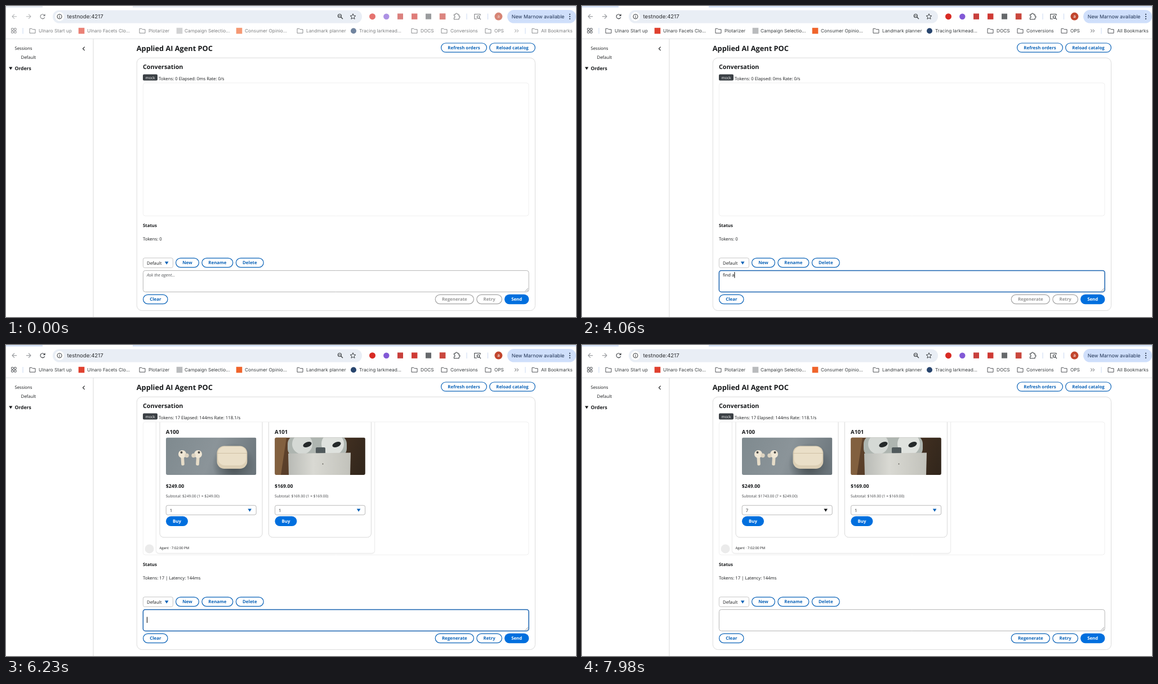
An HTML page with a canvas that plays this animation: 1012 by 553 pixels, repeating every 8 s.

```html
<!DOCTYPE html>
<html lang="en">
<head>
<meta charset="utf-8">
<title>Agent console</title>
<style>
html, body { margin: 0; width: 100%; height: 100%; overflow: hidden; background: #fff; }
canvas { display: block; width: 1012px; height: 553px; }
</style>
</head>
<body>
<canvas id="stage"></canvas>
<script>
const W = 1012, H = 553, LOOP = 8000;
const PAGE = "'Open Sans', 'Noto Sans', sans-serif";
const UI = "Inter, Roboto, sans-serif";
const BLUE = '#0b63b8', FILL = '#006fde', INK = '#17191b';
const QUERY = 'find avodels';

const canvas = document.getElementById('stage');
const g = canvas.getContext('2d');
const dpr = window.devicePixelRatio || 1;
canvas.width = W * dpr;
canvas.height = H * dpr;

// y is the middle of the capitals
function text(s, x, y, size, o = {}) {
  g.font = `${o.italic ? 'italic ' : ''}${o.weight || 400} ${size}px ${o.font || PAGE}`;
  g.textAlign = o.align || 'left';
  g.textBaseline = 'alphabetic';
  g.fillStyle = o.color || INK;
  g.fillText(s, x, y + size * 0.357);
}
const bold = (s, x, y, size, color) => text(s, x, y, size, { weight: 700, color });

function box(x, y, x2, y2, r, fill, stroke, lw = 1) {
  g.beginPath();
  g.roundRect(x, y, x2 - x, y2 - y, r);
  if (fill) { g.fillStyle = fill; g.fill(); }
  if (stroke) { g.strokeStyle = stroke; g.lineWidth = lw; g.stroke(); }
}
function disc(x, y, r, fill) {
  g.beginPath();
  g.arc(x, y, r, 0, 7);
  g.fillStyle = fill;
  g.fill();
}
function ring(x, y, r, color, lw = 1, from = 0, to = Math.PI * 2) {
  g.beginPath();
  g.arc(x, y, r, from, to);
  g.strokeStyle = color;
  g.lineWidth = lw;
  g.stroke();
}
function line(color, lw, ...p) {
  g.beginPath();
  for (let i = 0; i < p.length; i += 2) g.lineTo(p[i], p[i + 1]);
  g.strokeStyle = color;
  g.lineWidth = lw;
  g.stroke();
}
function poly(fill, ...p) {
  g.beginPath();
  for (let i = 0; i < p.length; i += 2) g.lineTo(p[i], p[i + 1]);
  g.closePath();
  g.fillStyle = fill;
  g.fill();
}
const down = (x, y, color) => poly(color, x - 3.3, y - 2.6, x + 3.3, y - 2.6, x, y + 2.8);

function pill(label, x, x2, y, kind = 'outline') {
  const mid = (x + x2) / 2;
  const look = {
    outline: [null, BLUE, BLUE],
    off: [null, '#a5a5a5', '#979797'],
    fill: [FILL, null, '#fff'],
    hover: ['#005fc0', null, '#fff'],
    dim: ['#e9e9e9', null, '#8f8f8f']
  }[kind];
  const d = look[1] ? 0.6 : 0;
  box(x + d, y + d, x2 - d, y + 17.4 - d, 8.7, look[0], look[1], 1.2);
  text(label, mid, y + 8.7, 7.85, { weight: 700, color: look[2], align: 'center' });
}

// last entry whose time has been reached
function step(t, list, start) {
  let v = start;
  for (const [at, value] of list) if (t >= at) v = value;
  return v;
}
const within = (t, spans) => spans.some(([a, b]) => t >= a && t < b);

function folder(x, y) {
  g.beginPath();
  g.moveTo(x - 5, y + 4);
  g.lineTo(x - 5, y - 4);
  g.lineTo(x - 1.2, y - 4);
  g.lineTo(x + 0.2, y - 2.5);
  g.lineTo(x + 5, y - 2.5);
  g.lineTo(x + 5, y + 4);
  g.closePath();
  g.lineJoin = 'round';
  g.strokeStyle = '#505357';
  g.lineWidth = 1;
  g.stroke();
}

function star(x, y, r) {
  g.beginPath();
  for (let i = 0; i < 10; i++) {
    const a = -Math.PI / 2 + i * Math.PI / 5, q = i % 2 ? r * 0.45 : r;
    g.lineTo(x + q * Math.cos(a), y + q * Math.sin(a));
  }
  g.closePath();
  g.strokeStyle = '#3c4043';
  g.lineWidth = 1;
  g.stroke();
}

function arrow(x, y, dir, color) {
  line(color, 1.1, x - 4.2 * dir, y, x + 4 * dir, y);
  line(color, 1.1, x, y - 4, x + 4 * dir, y, x, y + 4);
}

const marks = [
  [47, 'Ulnaro Start up', 58],
  [134, 'Ulnaro Facets Clo...', 144, '#e0402f'],
  [242, 'Plotarizer', 253],
  [308, 'Campaign Selectio...', 317, '#b9bbbd'],
  [414, 'Consumer Opinio...', 424, '#f0642c'],
  [522, 'Landmark planner', 533],
  [617, 'Tracing larkmead...', 627, '#28456e', true],
  [725, 'DOCS', 736],
  [778, 'Conversions', 789],
  [856, 'OPS', 867],
  [939, 'All Bookmarks', 950]
];

function browser(t) {
  const live = step(t, [[770, 0.5], [840, 1]], 0);
  const fade = 0.66 + 0.34 * live;
  g.fillStyle = live > 0.5 ? '#d5e2f7' : '#e3e8f0';
  g.fillRect(0, 0, W, 2.6);
  g.fillStyle = '#fff';
  g.fillRect(65, 0, 160, 3);

  box(83, 7.5, 632, 30.5, 11.5, '#e9eef5');
  disc(95, 18.8, 8, '#fff');
  ring(95, 18.8, 4, '#3c4043', 1.1);
  line('#3c4043', 1.1, 95, 18.3, 95, 21);
  line('#3c4043', 1.1, 95, 16.3, 95, 17.3);
  text('testnode:4217', 108.5, 18.8, 9.65, { font: UI, color: '#2b2d30' });
  ring(592.4, 17.5, 3, '#3c4043', 1.2);
  line('#3c4043', 1.3, 594.6, 19.7, 598, 23);
  line('#3c4043', 0.9, 590.8, 17.5, 594, 17.5);
  star(616, 19, 5.2);

  g.globalAlpha = fade;
  arrow(15, 18.7, -1, '#909397');
  arrow(40, 18.7, 1, '#909397');
  ring(65, 18.7, 3.9, '#45484c', 1.2, 0.3, 5.5);
  poly('#45484c', 69.6, 14, 69.6, 18, 65.6, 18);

  disc(650.5, 18.7, 5.5, '#d82b24');
  disc(675.3, 18.7, 5.2, '#8259d6');
  box(695, 13.4, 705, 23.8, 0, '#c8403c');
  box(720, 13.4, 730.4, 23.8, 0, '#cf3a34');
  box(745, 13.6, 755, 23.6, 0, '#66696c');
  box(769.8, 13.2, 780.4, 24, 0, '#c9473d');
  g.beginPath();
  g.moveTo(795.5, 15);
  g.lineTo(798, 15);
  g.arc(799.8, 14.6, 1.6, Math.PI, 0);
  g.lineTo(804, 15);
  g.lineTo(804, 18);
  g.arc(804.4, 19.5, 1.6, -Math.PI / 2, Math.PI / 2);
  g.lineTo(804, 23.8);
  g.lineTo(795.5, 23.8);
  g.lineTo(795.5, 21);
  g.arc(795.7, 19.3, 1.5, Math.PI / 2, -Math.PI / 2, true);
  g.closePath();
  g.strokeStyle = '#3c4043';
  g.lineWidth = 1.1;
  g.stroke();
  line('#3c4043', 1.1, 836, 23, 831.8, 23, 831.8, 14.5, 842, 14.5, 842, 17);
  ring(838.6, 19.6, 2.3, '#3c4043', 1.1);
  line('#3c4043', 1.1, 840.3, 21.3, 843, 24);
  disc(874.4, 18.6, 7, '#c2462e');
  text('a', 874.4, 17.7, 8, { font: UI, color: '#fff', align: 'center' });
  g.globalAlpha = 1;
  for (const x of [818, 855.5]) line('#cbd9f1', 1, x, 13.5, x, 24);

  box(890, 7, 1012, 30.6, 11.8, '#cfdffb');
  text('New Marnow available', 897.8, 18.8, 8.75, { font: UI, color: '#1e3152' });
  for (const y of [14.7, 18.7, 22.7]) disc(1001, y, 1.05, '#1e2c44');

  g.globalAlpha = fade;
  for (const x of [11.5, 16.5]) for (const y of [41.5, 46.5]) {
    box(x - 1.9, y - 1.9, x + 1.6, y + 1.6, 0.4, null, '#505357', 1);
  }
  for (const [x, label, tx, color, round] of marks) {
    if (!color) folder(x, 44.2);
    else if (round) disc(x, 44.2, 5, color);
    else box(x - 5.3, 38.8, x + 5.3, 49.4, 0, color);
    text(label, tx, 44.2, 8.25, { font: UI, color: '#3c4043' });
  }
  for (const x of [903.3, 907]) line('#505357', 1, x, 41.6, x + 2.6, 44.2, x, 46.8);
  g.globalAlpha = 1;
  for (const x of [30, 922]) line('#cbd9f1', 1, x, 39, x, 49.5);
  line('#dfe1e4', 1, 0, 58.3, W, 58.3);
}

function shell() {
  line('#d9d9d9', 1, 155, 58.5, 155, H);
  text('Sessions', 15.4, 75.5, 7.75);
  line(INK, 1.1, 139.6, 72.6, 136.4, 75.9, 139.6, 79.2);
  text('Default', 26.5, 91, 7.75);
  poly(INK, 5.2, 108.4, 11.4, 108.4, 8.3, 113.4);
  bold('Orders', 15.4, 110.8, 8.6);
  bold('Applied AI Agent POC', 231.8, 75, 12.75);
  pill('Refresh orders', 772, 854, 65.4);
  pill('Reload catalog', 858, 940, 65.4);
  box(232.3, 92.3, 939.5, 541.6, 9, '#fff', '#dcdcdc', 1);
  bold('Conversation', 243, 108.2, 10.75);
  box(243, 121.4, 269, 132.6, 2, '#3b4045');
  text('mock', 256, 127.2, 6.7, { color: '#fff', align: 'center' });
  bold('Status', 243, 389.8, 7.85);
}

function meta(who, x, y, color) {
  text(`${who} · 7:02:00 PM`, x, y, 6.1, { color });
}

function budPhoto() {
  const bg = g.createLinearGradient(284, 165, 444, 231);
  bg.addColorStop(0, '#7f8a8f');
  bg.addColorStop(0.5, '#8b9499');
  bg.addColorStop(1, '#697379');
  g.fillStyle = bg;
  g.fillRect(284, 164.5, 160.4, 66.5);
  const shade = g.createRadialGradient(404, 212, 10, 404, 212, 38);
  shade.addColorStop(0, '#4f585c');
  shade.addColorStop(1, 'rgba(79,88,92,0)');
  g.fillStyle = shade;
  g.fillRect(364, 172, 80, 59);
  box(374.5, 179.5, 428.3, 220, 13, '#dccfb5');
  box(376.5, 180.5, 426.5, 214, 12, '#eadfc8');
  line('#c9bc9f', 0.8, 375, 192.5, 428, 192.5);
  for (const s of [-1, 1]) {
    const x = 327 + s * 14;
    g.lineCap = 'round';
    line('#e6dcc8', 5.6, x, 196, x - s * 2 + s * 1, 211.5);
    g.lineCap = 'butt';
    disc(x, 194, 7, '#efe6d4');
    disc(x - s * 8, 196.5, 3.7, '#ddd3c0');
    disc(x + s * 1.5, 191, 2, '#4b4a46');
  }
}

function casePhoto() {
  const bg = g.createLinearGradient(477, 165, 638, 231);
  bg.addColorStop(0, '#65462e');
  bg.addColorStop(0.5, '#4a3524');
  bg.addColorStop(1, '#30251b');
  g.fillStyle = bg;
  g.fillRect(477, 164.5, 161, 66.5);
  poly('#82603f', 477, 164.5, 498, 164.5, 488, 231, 477, 231);
  box(500, 160, 605, 200, 16, '#aeb5b0');
  disc(526, 176, 18, '#d5d9d5');
  disc(580, 176, 20, '#dfe2de');
  for (const x of [535, 587]) {
    g.beginPath();
    g.ellipse(x, 177, 8, 4.4, -0.4, 0, 7);
    g.fillStyle = '#25292a';
    g.fill();
  }
  box(550, 182, 567, 193, 2, '#515a5c');
  const front = g.createLinearGradient(501, 0, 612, 0);
  front.addColorStop(0, '#b8bab5');
  front.addColorStop(0.4, '#d9d9d3');
  front.addColorStop(1, '#c2c2bb');
  poly(front, 501, 193, 612, 191.5, 611, 231, 502, 231);
  disc(562.5, 211.5, 0.9, '#55524c');
}

function card(x, name, price, qty, photo, caret, buy) {
  const total = (qty * price).toFixed(2);
  box(x - 11, 70, x + 171, 342, 7, '#fff', '#d8d8d8', 1);
  bold(name, x - 0.3, 154.8, 9.7);
  g.save();
  g.beginPath();
  g.roundRect(x, 164.5, 160.4, 66.5, 3);
  g.clip();
  photo();
  g.restore();
  bold('$' + price.toFixed(2), x - 0.3, 250.4, 8.75);
  text(`Subtotal: $${total} (${qty} × $${price.toFixed(2)})`, x - 0.3, 268.4, 6.65, { color: '#3b3d40' });
  box(x + 0.2, 285.2, x + 160.2, 302, 3, '#fff', '#b9b9b9', 1);
  text(qty, x + 6.7, 294, 7.75);
  down(x + 148.7, 293.8, caret);
  pill('Buy', x, x + 39, 304.6, buy);
}

function results(t) {
  g.shadowColor = 'rgba(0,0,0,.1)';
  g.shadowBlur = 2 * dpr;
  g.shadowOffsetY = dpr;
  box(266.5, 60, 654.5, 370.3, 5, '#fff');
  g.shadowColor = 'transparent';
  box(266.5, 60, 654.5, 370.3, 5, null, '#ececec', 1);
  const dark = within(t, [[6650, 7210], [7980, LOOP]]);
  const hover = within(t, [[6440, 6650]]);
  card(284, 'A100', 249, t >= 7700 ? 7 : 1, budPhoto, dark ? INK : BLUE, hover ? 'hover' : 'fill');
  card(477.4, 'A101', 169, 1, casePhoto, BLUE, 'fill');
  disc(254.6, 362.4, 8, '#ebebeb');
  meta('Agent', 272.5, 360.4);
  g.globalAlpha = step(t, [[6020, 0.75], [6090, 0.5], [6160, 0.25], [6230, 0]], 1);
  box(921.5, 221.5, 926.3, 371.5, 2.4, '#c3c3c3');
  g.globalAlpha = 1;
}

function chat(t) {
  g.save();
  g.beginPath();
  g.rect(243, 137, 685, 236);
  g.clip();
  if (t >= 5390) results(t);
  else if (t >= 5180) {
    box(866.4, 142.3, 924.6, 174.6, [6, 6, 1, 6], '#0572bb');
    text(QUERY, 872, 153, 7.75, { color: '#fff' });
    meta('You', 872, 165, '#fff');
    if (t >= 5250) {
      const words = t >= 5320 ? 'Searching catalog for' : 'Searching';
      box(266.5, 179.8, t >= 5320 ? 354.3 : 331, 211.8, 5, '#fff', '#ebebeb', 1);
      text(words, 272.5, 189.6, 7.75);
      meta('Agent', 272.5, 201.8);
      disc(254.6, 204, 8, '#ebebeb');
    }
  }
  g.restore();
  box(243.4, 136.8, 928, 373.2, 4, null, '#f0f0f0', 1);
}

function counters(t) {
  const [n, ms, rate] = step(t, [[5250, [1, 20, 50]], [5320, [3, 61, 49.2]], [5390, [17, 144, 118.1]]], [0, 0, 0]);
  text(`Tokens: ${n} Elapsed: ${ms}ms Rate: ${rate}/s`, 271, 129, 7.75);
  text(`Tokens: ${n}${n > 3 ? ' | Latency: 144ms' : ''}`, 243, 413.8, 7.75);
}

function composer(t) {
  const focus = within(t, [[770, 6790]]);
  const busy = within(t, [[5180, 5460]]);
  const sent = t >= 5180;
  const typed = sent ? 0 : step(t, [[1540, 1], [1610, 2], [1750, 3], [1820, 4], [1960, 5], [4060, 6],
    [4340, 7], [4410, 8], [4620, 9], [4830, 11], [4970, 12]], 0);

  box(243.4, 448, 296.4, 465.4, 3, '#fff', '#c6c6c6', 1);
  text('Default', 250, 457, 7.75);
  down(285.2, 457, BLUE);
  pill('New', 301, 343, 447.8);
  pill('Rename', 347.3, 403.4, 447.8);
  pill('Delete', 407.8, 457.8, 447.8);

  box(243.4, 470.4, 928.2, 508.4, 4, '#fff', focus ? '#1a63b0' : '#b6b6b6', focus ? 1.5 : 1);
  line('#77797c', 0.7, 921.6, 507.2, 927, 501.8);
  line('#77797c', 0.7, 924.4, 507.2, 927, 504.6);
  const value = QUERY.slice(0, typed);
  if (typed) text(value, 250, 478.3, 7.75);
  else if (!sent) text('Ask the agent...', 250, 478.3, 7.6, { italic: true, color: '#55585b' });
  if (within(t, [[770, 1260], [1540, 2520], [3080, 3570], [4060, 5740], [6230, 6790]])) {
    g.font = `400 7.75px ${PAGE}`;
    const x = 250.5 + (typed ? g.measureText(value).width : 0);
    const y = sent ? 483.5 : 473;
    line('#000', 1, x, y, x, y + 10.6);
  }

  pill('Clear', 243, 287.6, 512.8, busy ? 'off' : 'outline');
  if (busy) {
    const a = (t - 5320) / 70 * 0.6;
    ring(829.8, 518.8, 3.1, INK, 1.2, a - 2.4, a + 1.4);
    pill('Stop', 838.6, 881, 512.8);
  } else {
    pill('Regenerate', 761.6, 831, 512.8, sent ? 'outline' : 'off');
    pill('Retry', 835.2, 881, 512.8, sent ? 'outline' : 'off');
  }
  pill('Send', 885, 928.4, 512.8, busy ? 'dim' : 'fill');
}

function menu(t) {
  const a = step(t, [[6790, 0.15], [6860, 0.47], [6930, 0.8], [7000, 1], [7700, 0.6], [7770, 0.3], [7840, 0]], 0);
  if (!a) return;
  const hot = step(t, [[7210, 8], [7280, 7]], 0);
  g.globalAlpha = a;
  box(284.2, 155, 444, 284.6, 3, '#fff', '#c9c9c9', 1);
  for (let i = 1; i <= 8; i++) {
    const y = 164 + (i - 1) * 16.15;
    if (i === hot) box(284.8, y - 8, 443.4, y + 8, 0, '#f0f0f0');
    if (i < 8) line('#ededed', 0.8, 284.8, y + 8.1, 443.4, y + 8.1);
    text(i, 291, y, 7.75);
  }
  if (!hot) box(285, 156, 443.2, 171.6, 2.5, null, '#1a63b0', 1.8);
  line('#303336', 1.1, 428.4, 164.4, 430.8, 166.8, 436, 160.8);
  g.globalAlpha = 1;
}

function draw(now) {
  const t = now % LOOP;
  g.setTransform(dpr, 0, 0, dpr, 0, 0);
  g.textRendering = 'geometricPrecision';
  g.fillStyle = '#fff';
  g.fillRect(0, 0, W, H);
  browser(t);
  shell();
  chat(t);
  counters(t);
  composer(t);
  menu(t);
}

let start;
function tick(now) {
  if (start === undefined) start = now;
  draw(Math.max(0, now - start));
  requestAnimationFrame(tick);
}
draw(0);
requestAnimationFrame(tick);
</script>
</body>
</html>
```
